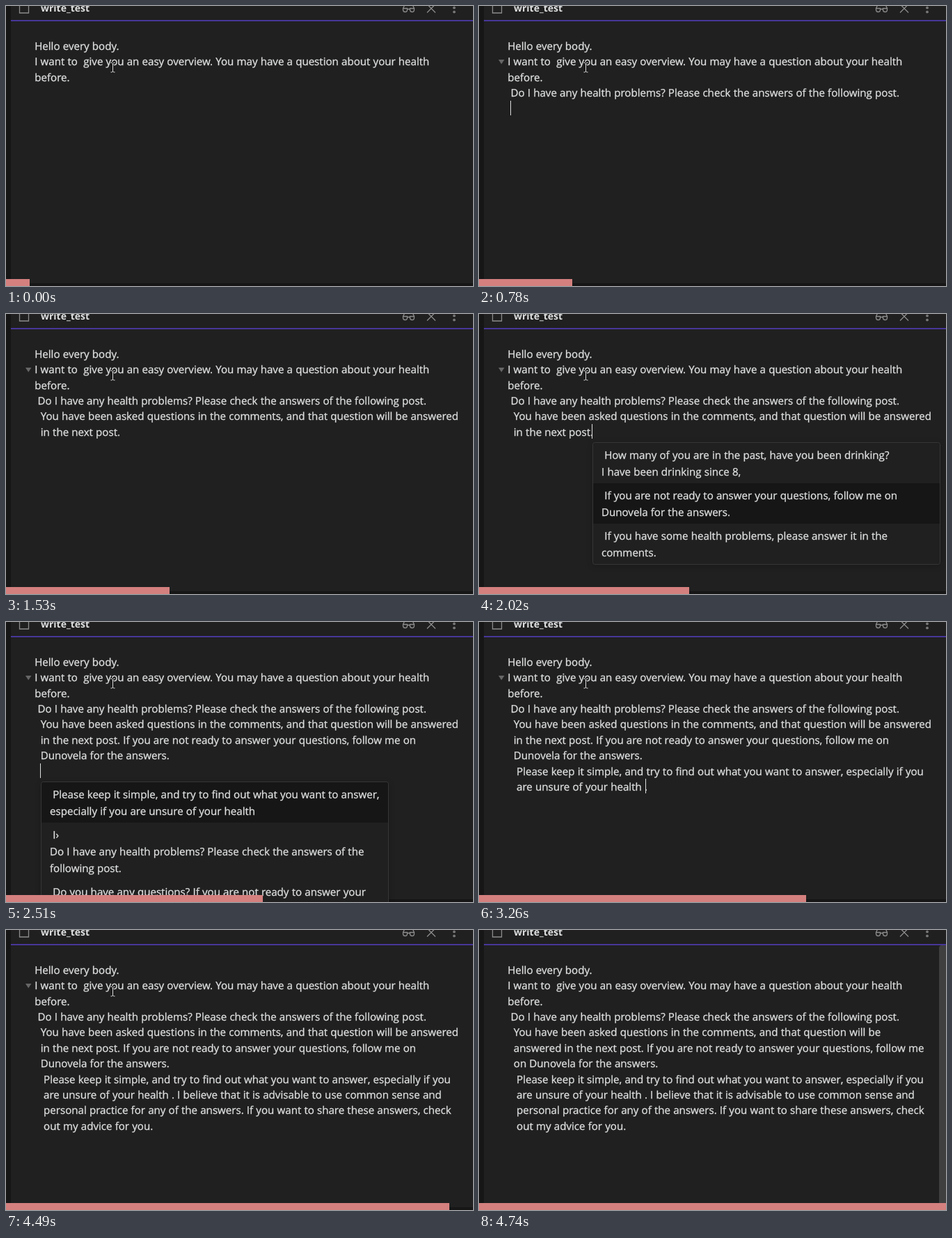
Recreate the animation shown at these times as an HTML page. Size 671 px wide and 402 px high, loop 4980 ms.

```html
<!DOCTYPE html>
<html lang="en">
<head>
<meta charset="utf-8">
<title>Writing suggestions</title>
<style>
  html, body { margin: 0; width: 100%; height: 100%; overflow: hidden; background: #202020; }
  svg { display: block; }
  text {
    font: 15.1px "Open Sans", "Noto Sans", sans-serif;
    word-spacing: .25px;
    fill: #dfe0e1;
    stroke: #dfe0e1;
    stroke-width: .3px;
    text-rendering: geometricPrecision;
  }
  .title { font-size: 14px; font-weight: 700; stroke: none; }
  .icon { fill: none; stroke: #8c8c8c; stroke-width: 1.3; }
  .popup { filter: drop-shadow(0 2px 4px rgba(0, 0, 0, .2)); }
</style>
</head>
<body>
<svg id="stage" width="671" height="402" viewBox="0 0 671 402">
  <rect width="671" height="402" fill="#202020"/>
  <rect width="7" height="402" fill="#161616"/>
  <rect y="398" width="671" height="4" fill="#161616"/>
  <rect x="7" y="20" width="664" height="2" fill="#483699"/>
  <text class="title" x="50" y="8">write_test</text>
  <g class="icon">
    <path d="M19.5 -3V10H32.5V-3"/>
    <path d="M570.5 3.5H576.5V5.5A3 3 0 0 1 570.5 5.5ZM580.5 3.5H586.5V5.5A3 3 0 0 1 580.5 5.5ZM576.5 4.5H580.5"/>
    <path d="M570.5 3.5L573 -2M586.5 3.5L584 -2M605 -2.5L617 9.5M617 -2.5L605 9.5"/>
    <circle cx="644" cy="2.5" r="1.2"/>
    <circle cx="644" cy="8.5" r="1.2"/>
  </g>
  <g id="content"></g>
  <rect id="progress" y="392" height="10" fill="#d4807f"/>
</svg>
<script>
const LOOP = 4980;
const STARTS = [0, 250, 500, 780, 1030, 1280, 1530, 1770, 2020, 2260,
  2510, 2760, 3010, 3260, 3510, 3760, 4010, 4250, 4490, 4740];
const END = STARTS.length;
const ROW_HEIGHT = 22.4;
const content = document.getElementById('content');
const progress = document.getElementById('progress');
const parts = [];

function add(parent, tag, attributes, text = '') {
  const node = document.createElementNS('http://www.w3.org/2000/svg', tag);
  for (const [name, value] of Object.entries(attributes)) node.setAttribute(name, value);
  node.textContent = text.replace(/ /g, '\u00a0');
  return parent.appendChild(node);
}

// A part is visible from step `from` up to, but not including, step `to`.
function part(from, to = END) {
  const node = add(content, 'g', {});
  parts.push({ node, from, to });
  return node;
}

// Baselines sit on whole pixels.
function line(row, indent, text, from, to) {
  const y = Math.round(62.8 + ROW_HEIGHT * row);
  add(part(from, to), 'text', { x: 41.2 + 4.3 * indent, y }, text);
}

function caret(row, x, from, to) {
  const y = Math.round(46 + ROW_HEIGHT * row);
  add(part(from, to), 'rect', { x, y, width: 1, height: 21, fill: '#dcddde' });
}

function popup(x, y, items, selected, from, to) {
  const group = part(from, to);
  const heights = items.map(item => 24 * item.split('\n').length + 10);
  const height = heights.reduce((sum, h) => sum + h, 1);
  const frame = { x: x + .5, y: y + .5, width: 499, height, rx: 3 };
  add(group, 'rect', { ...frame, fill: '#202020', class: 'popup' });
  let top = y + 1;
  items.forEach((item, i) => {
    if (i === selected)
      add(group, 'rect', { x: x + 1, y: top, width: 498, height: heights[i], fill: '#161616' });
    item.split('\n').forEach((text, n) =>
      add(group, 'text', { x: x + 13, y: top + 23 + 24 * n }, text));
    top += heights[i];
  });
  add(group, 'rect', { ...frame, fill: 'none', stroke: '#363636' });
}

line(0, 0, 'Hello every body.', 0);
line(1, 0, 'I want to  give you an easy overview. You may have a question about your health', 0);
line(2, 0, 'before.', 0);
line(3, 1, 'Do I have any health problems? Please check the answers of the following post.', 3);

line(4, 2, 'You have been asked questions in the comments, and that question will be answered', 6, 19);
line(5, 2, 'in the next post.', 6, 9);
line(5, 2, 'in the next post. If you are not ready to answer your questions, follow me on', 9, 19);
line(6, 2, 'Dunovela for the answers.', 9, 19);
line(4, 2, 'You have been asked questions in the comments, and that question will be', 19);
line(5, 2, 'answered in the next post. If you are not ready to answer your questions, follow me', 19);
line(6, 2, 'on Dunovela for the answers.', 19);

line(7, 3, 'Please keep it simple, and try to find out what you want to answer, especially if you', 11);
line(8, 3, 'are unsure of your health', 11, 13);
line(8, 3, 'are unsure of your health .', 13, 16);
line(8, 3, 'are unsure of your health . I believe that it is advisable to use common sense and', 16);
line(9, 3, 'personal practice for any of the answers.', 16, 18);
line(9, 3, 'personal practice for any of the answers. If you want to share these answers, check', 18);
line(10, 3, 'out my advice for you.', 18);

caret(3, 41, 2, 3);
caret(4, 45, 3, 5);
caret(5, 162, 7, 9);
caret(7, 49, 9, 11);
caret(8, 232, 12, 13);
caret(8, 239, 13, 15);
caret(9, 339, 17, 18);

const healthItems = [
  ' If you have any questions about your health, please ask\nthem in the comments.',
  ' Do I have any health problems? Please check the\nanswers of the following post.',
  ' What is a healthy day?'
];
popup(41, 139, healthItems, 0, 1, 2);
popup(41, 139, healthItems, 1, 2, 3);

const hospitalItems = [
  ' In the beginning of the day a man in a hospital has a medical\nexam, and his chest is filled with red blood cells.',
  ' You have been asked questions in the comments, and that\nquestion will be answered in the next post.',
  ' A little bit.'
];
popup(45, 162, hospitalItems, 0, 4, 5);
popup(45, 162, hospitalItems, 1, 5, 6);

const followItems = [
  ' How many of you are in the past, have you been drinking?\nI have been drinking since 8,',
  ' If you are not ready to answer your questions, follow me on\nDunovela for the answers.',
  ' If you have some health problems, please answer it in the\ncomments.'
];
popup(163, 184, followItems, 0, 7, 8);
popup(163, 184, followItems, 1, 8, 9);

popup(50, 229, [
  ' Please keep it simple, and try to find out what you want to answer,\nespecially if you are unsure of your health',
  ' I›\nDo I have any health problems? Please check the answers of the\nfollowing post.',
  ' Do you have any questions? If you are not ready to answer your\nquestions, follow me.'
], 0, 10, 11);

popup(191, 251, [
  ' I believe that it is advisable to use common sense and\npersonal practice for any of the answers.',
  ' If you are not sure, please ask a doctor.',
  ' Please check the answers.'
], 0, 14, 16);

popup(191, 274, [
  ' If you want to share these answers, check out my advice\nfor you.',
  ' Please answer the questions.'
], 0, 17, 18);

add(part(3, 19), 'path', { d: 'M28 77H36.5L32.2 83.5Z', fill: '#666' });

const pointer = part(0, 19);
const beam = 'M150.5 81.5H152.5L153.5 82.5L154.5 81.5H156.5M153.5 82.5V94M150.5 95H152.5L153.5 94L154.5 95H156.5';
add(pointer, 'path', { d: beam, fill: 'none', stroke: '#111', 'stroke-width': 2.6 });
add(pointer, 'path', { d: beam, fill: 'none', stroke: '#e8e8e8' });

add(part(19), 'rect', { x: 661, y: 22, width: 12, height: 390, rx: 4, fill: '#3f3f3f' });

function render(now) {
  const time = now % LOOP;
  const step = STARTS.findLastIndex(start => start <= time);
  for (const { node, from, to } of parts)
    node.style.display = step >= from && step < to ? '' : 'none';
  progress.setAttribute('width', Math.round(671 * (step + 1) / END));
  requestAnimationFrame(() => render(performance.now()));
}
render(0);
</script>
</body>
</html>
```
